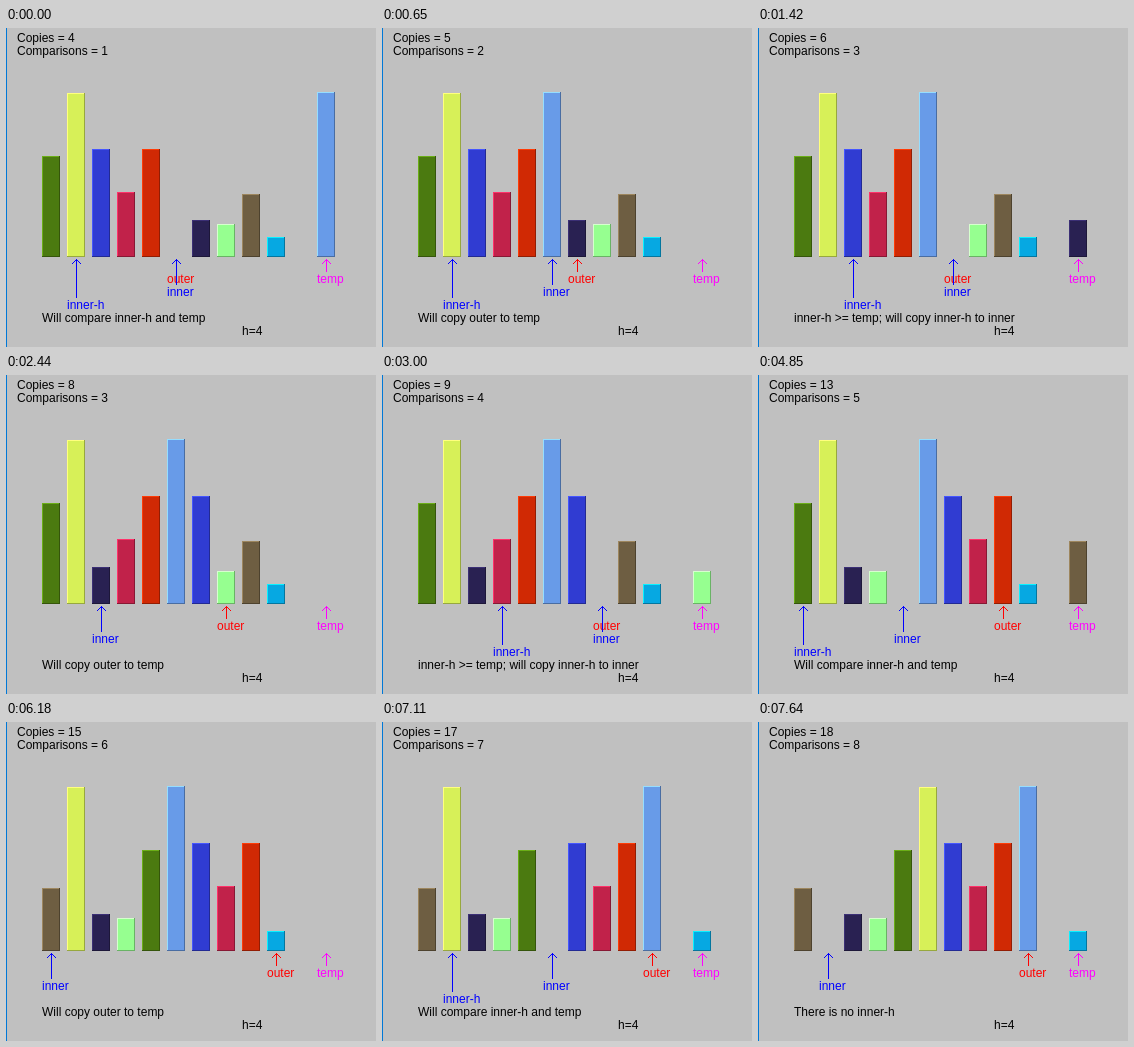
Write an HTML page with a canvas that moves like this. It is 370 by 319 pixels and loops after 8000 ms.

```html
<!DOCTYPE html>
<html lang="en">
<head>
<meta charset="utf-8">
<title>Shellsort, h = 4</title>
<style>
  html, body { margin: 0; width: 100%; height: 100%; overflow: hidden; background: #c0c0c0; }
  canvas { display: block; }
</style>
</head>
<body>
<canvas id="stage" width="370" height="319"></canvas>
<script>
const ctx = document.getElementById('stage').getContext('2d');
const LOOP = 8000, H = 4, BASE = 229, TEMP_SLOT = 11;
const stepTimes = [0, 250, 650, 1020, 1420, 1730, 2040, 2440, 2750, 3000, 3370, 3620, 3890,
  4290, 4570, 4850, 5280, 5590, 5900, 6180, 6460, 6830, 7110, 7390, 7640];

const bar = (height, r, g, b) => ({ height, rgb: [r, g, b] });

// Runs the sort from the middle of a pass, yielding a snapshot per step.
function* sortSteps() {
  const bars = [
    bar(101, 75, 122, 16), bar(164, 215, 240, 88), bar(108, 48, 60, 210),
    bar(65, 193, 34, 74), bar(108, 208, 41, 4), null, bar(37, 41, 33, 82),
    bar(33, 150, 255, 144), bar(63, 110, 94, 66), bar(20, 6, 168, 226)];
  let temp = bar(165, 104, 155, 232);
  let outer = 5, inner = 5, copies = 4, comparisons = 1;
  const snap = note => ({ bars: [...bars], temp, outer, inner, copies, comparisons, note });

  while (true) {
    while (true) {
      if (inner < H) {
        yield snap('There is no inner-h');
        yield snap('Will copy temp to inner');
        break;
      }
      yield snap('Will compare inner-h and temp');
      comparisons++;
      if (bars[inner - H].height < temp.height) {
        yield snap('inner-h < temp; will copy temp to inner');
        break;
      }
      yield snap('inner-h >= temp; will copy inner-h to inner');
      bars[inner] = bars[inner - H];
      bars[inner -= H] = null;
      copies++;
    }
    bars[inner] = temp;
    temp = null;
    copies++;
    outer++;
    yield snap('Will copy outer to temp');
    temp = bars[outer];
    bars[outer] = null;
    inner = outer;
    copies++;
  }
}

const source = sortSteps();
const steps = stepTimes.map(() => source.next().value);

const slotX = slot => 36 + 25 * slot;

function rect(color, x, y, w, h) {
  ctx.fillStyle = color;
  ctx.fillRect(x, y, w, h);
}

function text(string, x, y, color = '#000') {
  ctx.fillStyle = color;
  ctx.fillText(string, x, y);
}

function drawBar(item, slot) {
  if (!item) return;
  const { height, rgb } = item, x = slotX(slot), y = BASE - height;
  const shade = k => `rgb(${rgb.map(v => Math.min(255, Math.round(v * k)))})`;
  rect(shade(0.7), x, y, 18, height);
  rect(shade(1 / 0.7), x, y, 17, height - 1);
  rect(shade(1), x + 1, y + 1, 16, height - 2);
}

function drawPointer(label, slot, row, color) {
  const x = slotX(slot) + 9, top = 231;
  rect(color, x, top, 1, 13 + 13 * row);
  for (let k = 1; k < 5; k++) {
    rect(color, x - k, top + k, 1, 1);
    rect(color, x + k, top + k, 1, 1);
  }
  text(label, slotX(slot), 255 + 13 * row, color);
}

function draw(s) {
  rect('#c0c0c0', 0, 0, 370, 319);
  rect('#0078d7', 0, 0, 1, 319);
  ctx.font = '12px "Liberation Sans", Arial, sans-serif';
  text(`Copies = ${s.copies}`, 11, 14);
  text(`Comparisons = ${s.comparisons}`, 11, 27);
  s.bars.forEach(drawBar);
  drawBar(s.temp, TEMP_SLOT);
  drawPointer('outer', s.outer, 0, '#f00');
  drawPointer('temp', TEMP_SLOT, 0, '#f0f');
  drawPointer('inner', s.inner, 1, '#00f');
  if (s.inner >= H) drawPointer('inner-h', s.inner - H, 2, '#00f');
  text(s.note, 36, 294);
  text(`h=${H}`, 236, 307);
}

function tick() {
  const t = performance.now() % LOOP;
  draw(steps[stepTimes.findLastIndex(start => start <= t)]);
  requestAnimationFrame(tick);
}
tick();
</script>
</body>
</html>
```
